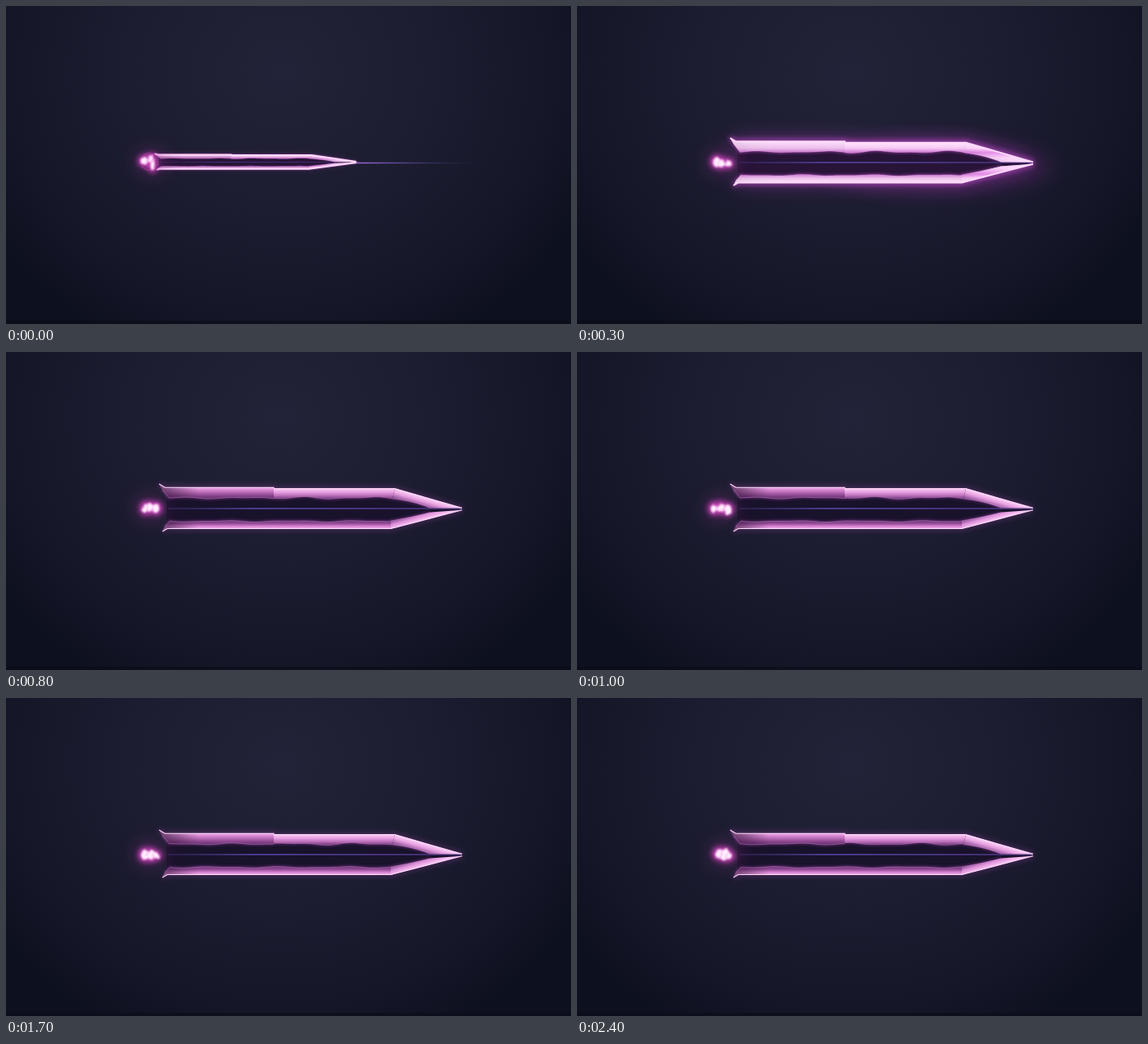
Recreate the animation shown at these times as an HTML page. Size 690 px wide and 388 px high, loop 2.5 s.

```html
<!DOCTYPE html>
<html lang="en">
<head>
<meta charset="utf-8">
<title>Plasma blade</title>
<style>
  html, body { margin: 0; width: 100%; height: 100%; overflow: hidden; background: #171829; }
  svg { display: block; width: 100vw; height: 100vh; }
  #edge { vector-effect: non-scaling-stroke; }
</style>
</head>
<body>
<svg viewBox="0 0 690 388" preserveAspectRatio="none">
  <defs>
    <radialGradient id="bg" gradientUnits="userSpaceOnUse" cx="335" cy="80" r="415" gradientTransform="translate(0 8) scale(1 .9)">
      <stop offset="0" stop-color="#222338"/>
      <stop offset=".45" stop-color="#1c1d30"/>
      <stop offset=".8" stop-color="#151729"/>
      <stop offset="1" stop-color="#0d101e"/>
    </radialGradient>
    <linearGradient id="topLeft" gradientUnits="userSpaceOnUse" x1="0" y1="165" x2="0" y2="179">
      <stop offset="0" stop-color="#f0aaea"/>
      <stop offset=".3" stop-color="#cf7fca"/>
      <stop offset=".7" stop-color="#8f4890"/>
      <stop offset="1" stop-color="#5f2f6a"/>
    </linearGradient>
    <linearGradient id="topRight" gradientUnits="userSpaceOnUse" x1="0" y1="166" x2="0" y2="179">
      <stop offset="0" stop-color="#fccff7"/>
      <stop offset=".4" stop-color="#e69fe0"/>
      <stop offset=".75" stop-color="#b569b4"/>
      <stop offset="1" stop-color="#6c3878"/>
    </linearGradient>
    <linearGradient id="topTip" gradientUnits="userSpaceOnUse" x1="475" y1="167" x2="471.5" y2="179">
      <stop offset="0" stop-color="#fccff7"/>
      <stop offset=".4" stop-color="#e69fe0"/>
      <stop offset="1" stop-color="#783f84"/>
    </linearGradient>
    <linearGradient id="low" gradientUnits="userSpaceOnUse" x1="0" y1="216" x2="0" y2="206">
      <stop offset="0" stop-color="#fab8f2"/>
      <stop offset=".35" stop-color="#d480ce"/>
      <stop offset=".7" stop-color="#8e4891"/>
      <stop offset="1" stop-color="#703a7c"/>
    </linearGradient>
    <linearGradient id="lowTip" gradientUnits="userSpaceOnUse" x1="472" y1="216" x2="469" y2="206">
      <stop offset="0" stop-color="#fac2f4"/>
      <stop offset=".5" stop-color="#dc90d8"/>
      <stop offset="1" stop-color="#844890"/>
    </linearGradient>
    <linearGradient id="hot" gradientUnits="userSpaceOnUse" x1="0" y1="165" x2="0" y2="216">
      <stop offset="0" stop-color="#fff0ff"/>
      <stop offset=".17" stop-color="#ffd8fd"/>
      <stop offset=".27" stop-color="#e084e6"/>
      <stop offset=".4" stop-color="#ffe0ff"/>
      <stop offset=".65" stop-color="#ffe0ff"/>
      <stop offset=".79" stop-color="#e084e6"/>
      <stop offset=".88" stop-color="#ffd8fd"/>
      <stop offset="1" stop-color="#fff0ff"/>
    </linearGradient>
    <linearGradient id="fade" gradientUnits="userSpaceOnUse" x1="188" y1="0" x2="235" y2="0">
      <stop offset="0" stop-color="#2a1433" stop-opacity=".65"/>
      <stop offset="1" stop-color="#2a1433" stop-opacity="0"/>
    </linearGradient>
    <linearGradient id="core" gradientUnits="userSpaceOnUse" x1="194" y1="0" x2="556" y2="0">
      <stop offset="0" stop-color="#39306e" stop-opacity=".4"/>
      <stop offset=".3" stop-color="#4b3a8a"/>
      <stop offset="1" stop-color="#3f2c6c"/>
    </linearGradient>
    <linearGradient id="ray" gradientUnits="userSpaceOnUse" x1="424" y1="0" x2="578" y2="0">
      <stop offset="0" stop-color="#a56be0"/>
      <stop offset=".35" stop-color="#5a4796"/>
      <stop offset="1" stop-color="#2c2a52" stop-opacity="0"/>
    </linearGradient>
    <filter id="soft" filterUnits="userSpaceOnUse" x="90" y="90" width="560" height="210"><feGaussianBlur stdDeviation="3"/></filter>
    <filter id="near" filterUnits="userSpaceOnUse" x="90" y="90" width="560" height="210"><feGaussianBlur stdDeviation="1.4"/></filter>
    <filter id="wide" filterUnits="userSpaceOnUse" x="60" y="60" width="600" height="270"><feGaussianBlur stdDeviation="12"/></filter>
    <filter id="ragged" filterUnits="userSpaceOnUse" x="130" y="160" width="90" height="60" color-interpolation-filters="sRGB">
      <feTurbulence id="noise" type="fractalNoise" baseFrequency=".14" numOctaves="2"/>
      <feDisplacementMap in="SourceGraphic" scale="6" xChannelSelector="R" yChannelSelector="G"/>
      <feGaussianBlur stdDeviation=".8"/>
    </filter>
  </defs>

  <rect width="690" height="388" fill="url(#bg)"/>
  <rect y="384" width="690" height="4" fill="#0a0c18" opacity=".6"/>
  <ellipse id="bloom" cx="440" cy="196" rx="140" ry="32" fill="#a030a8" filter="url(#wide)"/>
  <path id="ray-line" d="M424 191.5H578" stroke="url(#ray)" stroke-width="1.3"/>

  <g id="blade">
    <path id="halo" fill="#b03cc0" filter="url(#wide)"/>
    <path id="rim" fill="none" stroke="#b848c4" stroke-width="5" filter="url(#soft)"/>
    <path id="cavity" d="M196 166H475L556 191L470 215H196Z"/>
    <path id="inner-glow" fill="none" stroke="#7c3486" stroke-width="3" filter="url(#near)"/>
    <path d="M198 191H556" stroke="url(#core)" stroke-width="1.8"/>
    <path id="top-left" fill="url(#topLeft)"/>
    <path id="top-right" fill="url(#topRight)"/>
    <path id="top-tip" fill="url(#topTip)"/>
    <path id="low-body" fill="url(#low)"/>
    <path id="low-tip" fill="url(#lowTip)"/>
    <path id="shade" fill="url(#fade)"/>
    <path id="inner" fill="none" stroke="#cf86d0" stroke-width=".9" opacity=".5"/>
    <path id="flash" fill="url(#hot)"/>
    <path id="edge" fill="none" stroke="#ffd9fa"/>
  </g>

  <g id="orb">
    <circle cx="175" cy="190" r="10.5" fill="#3a1740" stroke="#8a3c80" stroke-width="1.2" opacity=".75"/>
  </g>
  <ellipse id="aura" cy="190.5" rx="17" ry="12" fill="#a8309c" opacity=".45" filter="url(#wide)"/>
  <g id="plasma-glow" fill="#c840b8" filter="url(#soft)"></g>
  <g id="plasma" fill="#fff0fd" stroke="#f5a0ea" stroke-width="1" filter="url(#ragged)"></g>
</svg>

<script>
const LOOP = 2500, STEP = 100, MID = 191;
const $ = id => document.getElementById(id);
const set = (el, attrs) => { for (const k in attrs) el.setAttribute(k, attrs[k]); };
const mix = (a, b, k) => a + (b - a) * k;

// Opening of the blade, by step: horizontal scale, vertical scale, flash
const OPENING = [[.666, .34, .9], [.88, .7, 1], [1, 1, 1], [1, 1, .8], [1, 1, .35], [1, 1, .04]];

// Plasma poses: time, then three lobes of x, y, rx, ry
const POSES = [
  [0, 169, 189, 4, 4, 177, 186, 3, 3, 179, 194, 2, 6],
  [300, 171, 190, 4.5, 5, 177, 192, 4, 4, 185, 192, 3, 3],
  [500, 171, 190, 3, 5, 177, 191, 3, 4, 185, 191, 4, 5],
  [1000, 167, 191, 3, 5, 175, 190, 4, 5, 184, 192, 4, 5],
  [1400, 174, 191, 5, 4, 180, 190, 5, 6, 187, 192, 3, 2],
  [2000, 163, 190, 3, 7, 172, 191, 4, 5, 182, 192, 4, 4],
  [2400, 174, 190, 5, 5, 181, 191, 5, 6, 186, 193, 3, 3]
];

const addLobes = group => [0, 1, 2].map(() =>
  group.appendChild(document.createElementNS("http://www.w3.org/2000/svg", "ellipse")));
const cores = addLobes($("plasma")), glows = addLobes($("plasma-glow"));

function wavePoints(from, to, base, size, phase) {
  const points = [];
  for (let x = from; x <= to; x += 4) {
    const y = base + size * (Math.sin(x / 13 + phase) + .6 * Math.sin(x / 7.3 - phase * .7));
    points.push(`${x} ${y.toFixed(2)}`);
  }
  return points;
}
const line = points => "M" + points.join("L");
const under = (points, outline) => outline + "L" + [...points].reverse().join("L") + "Z";

function drawBlade(step) {
  const [sx, sy, flash] = OPENING[step] || [1, 1, 0];
  const phase = step * .13;
  const left = ["191 168", ...wavePoints(199, 327, 178, .7, phase)];
  const right = wavePoints(327, 471, 178, 1, phase + 1);
  const low = ["194 213", ...wavePoints(200, 468, 206.5, .6, phase + 2), "470 206"];
  const parts = {
    "top-left": under(left, "M187 161L194 165H327"),
    "top-right": under(right, "M327 166.3H475L472 179"),
    "top-tip": "M475 166.3L557 190.4L518 190.6Q498 182 472 179Z",
    "low-body": under(low, "M191 219L197 215.8H470"),
    "low-tip": "M470 215.8L557 192.8L518 195.5Q494 202 470 206Z"
  };
  for (const id in parts) set($(id), { d: parts[id] });

  const outline = "M187 161L194 165.3H327V166.7H475L557 190.4M191 219L197 215.5H470L557 192.8";
  const inside = line(left) + line(right) + "Q498 182 518 190" + line(low) + "Q494 202 518 196";
  const whole = Object.values(parts).join("");
  set($("edge"), { d: outline, "stroke-width": mix(1.1, 2.2, flash) });
  set($("rim"), { d: outline, opacity: mix(.3, 1, flash) });
  set($("inner"), { d: inside });
  set($("inner-glow"), { d: inside, opacity: mix(.6, 1, flash) });
  set($("shade"), { d: parts["top-left"] + parts["low-body"], opacity: 1 - flash * .6 });
  set($("halo"), { d: whole, opacity: step ? flash * .9 : .25 });
  set($("flash"), { d: whole, opacity: step ? flash : .45 });
  set($("bloom"), { opacity: step ? flash * .3 : 0 });
  set($("cavity"), { fill: `rgb(${mix(25, 42, flash)},${mix(18, 20, flash)},${mix(43, 58, flash)})` });

  const x0 = step ? 194 : 186;
  set($("blade"), { transform: `translate(${x0} ${MID - (1 - sy)}) scale(${sx} ${sy}) translate(-194 ${-MID})` });
}

function drawPlasma(step) {
  const time = step * STEP;
  const next = Math.max(1, POSES.findIndex(p => p[0] >= time));
  const a = POSES[next - 1], b = POSES[next];
  const k = (time - a[0]) / (b[0] - a[0]);
  const jitter = Math.sin(k * Math.PI) * 1.5;
  cores.forEach((core, i) => {
    const value = j => mix(a[1 + i * 4 + j], b[1 + i * 4 + j], k);
    const cx = value(0) + jitter * Math.sin(step * 4.1 + i * 2);
    const cy = value(1) + jitter * .6 * Math.cos(step * 3.3 + i);
    set(core, { cx, cy, rx: value(2) + .4, ry: value(3) + .4 });
    set(glows[i], { cx, cy, rx: value(2) + 4, ry: value(3) + 3.5 });
  });
  set($("aura"), { cx: mix(a[5], b[5], k) });
  set($("noise"), { seed: step + 3 });
}

function draw(time) {
  const step = Math.floor((time % LOOP) / STEP);
  drawBlade(step);
  drawPlasma(step);
  $("ray-line").style.opacity = step ? 0 : 1;
  $("orb").style.opacity = step ? 0 : 1;
}

const start = performance.now();
function tick() {
  draw(performance.now() - start);
  requestAnimationFrame(tick);
}
tick();
</script>
</body>
</html>
```
